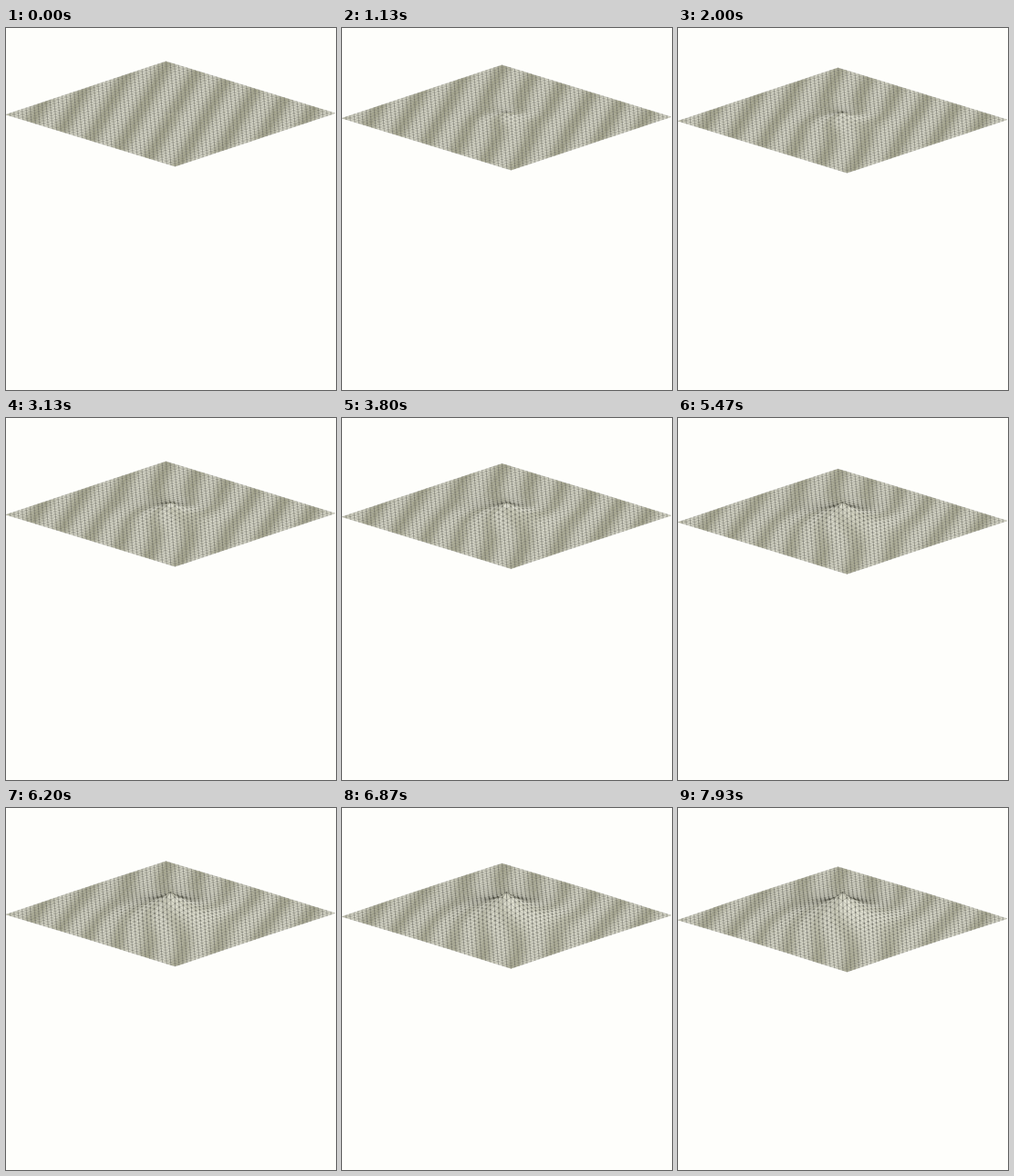
An HTML page with a canvas that plays this animation: 362x398 px, repeating every 8000 ms.

```html
<!DOCTYPE html>
<html lang="en">
<head>
<meta charset="utf-8">
<title>Growing peak on a mesh</title>
<style>
html, body { margin: 0; width: 100%; height: 100%; overflow: hidden; background: #fefefb; }
canvas { display: block; width: 362px; height: 398px; }
</style>
</head>
<body>
<canvas id="stage" width="362" height="398"></canvas>
<script>
const W = 362, H = 398, LOOP = 8000, STEP = 1000 / 15, STEPS = 120;
const N = 40;
const LEFT = { x: 0, y: 95.2 };
const UP = { x: 175.5, y: -58.5 };    // left corner to back corner
const DOWN = { x: 185.5, y: 57 };     // left corner to front corner
const LIGHT = [219, 219, 204], DARK = [172, 172, 148];
const ctx = document.getElementById("stage").getContext("2d");

const clamp = (v, lo, hi) => Math.max(lo, Math.min(hi, v));

// Screen position, height and band offset of every mesh vertex
function buildMesh(progress) {
  const sink = 28.2 * progress;
  const peak = 1.5 + sink;
  const growth = Math.sqrt(progress);
  const spread = 1.2 + 4.7 * growth;
  const mesh = [];
  for (let u = 0; u <= N; u++) {
    mesh.push([]);
    for (let v = 0; v <= N; v++) {
      const du = u - N / 2, dv = v - N / 2;
      const r = Math.hypot(du, dv);
      const h = peak * Math.exp(-r / spread);
      const toFront = (dv - du) / Math.SQRT2 / Math.max(r, 1);
      const bend = 72 * growth * toFront * Math.exp(-r / (1 + 8 * growth));
      const x = LEFT.x + (UP.x * u + DOWN.x * v) / N;
      const flatY = LEFT.y + (UP.y * u + DOWN.y * v) / N;
      mesh[u].push({ x, y: flatY + sink - h, h, band: x + 0.55 * flatY + bend });
    }
  }
  return mesh;
}

// Oblique bands that turn around the peak and fade on it, plus light from the right
function shade(a, b, c, slope) {
  const mean = key => (a[key] + b[key] + c[key]) / 3;
  const wave = 0.5 + 0.5 * Math.cos(2 * Math.PI * (mean("band") - 198) / 37.5);
  const band = Math.pow(wave, 1.3) / (1 + mean("h") * 0.15);
  const glow = clamp(-slope * 4, -16, 7);
  return `rgb(${LIGHT.map((v, i) => Math.round(v + (DARK[i] - v) * band + glow))})`;
}

function path(...points) {
  ctx.beginPath();
  points.forEach(p => ctx.lineTo(p.x, p.y));
  ctx.closePath();
}

function fillTriangle(a, b, c, slope) {
  path(a, b, c);
  ctx.fillStyle = shade(a, b, c, slope);
  ctx.fill();
}

function strokePath(width, color, ...points) {
  path(...points);
  ctx.lineWidth = width;
  ctx.strokeStyle = color;
  ctx.stroke();
}

function drawCell(mesh, u, v) {
  const left = mesh[u][v], back = mesh[u + 1][v];
  const front = mesh[u][v + 1], right = mesh[u + 1][v + 1];
  const slope = right.h - left.h;
  fillTriangle(left, back, front, slope);
  fillTriangle(back, front, right, slope);
  strokePath(0.4, "rgba(65,65,55,0.4)", left, back, right, front);
  strokePath(0.35, "rgba(50,50,45,0.6)", back, front);

  // Knots stand out where the mesh is raised
  ctx.fillStyle = `rgba(40,40,35,${clamp(front.h * 0.06, 0, 0.5)})`;
  ctx.fillRect(front.x - 0.8, front.y - 0.8, 1.6, 1.6);
}

function draw(progress) {
  ctx.fillStyle = "#fefefb";
  ctx.fillRect(0, 0, W, H);
  const mesh = buildMesh(progress);
  // Back to front
  for (let row = 1 - N; row < N; row++) {
    for (let u = Math.max(0, -row); u < Math.min(N, N - row); u++) {
      drawCell(mesh, u, u + row);
    }
  }
}

let shown = -1;
const start = performance.now();
function tick() {
  const t = (performance.now() - start) % LOOP;
  const step = Math.min(STEPS - 1, Math.floor((t + 5) / STEP));
  if (step !== shown) {
    shown = step;
    draw(step / (STEPS - 1));
  }
  requestAnimationFrame(tick);
}
tick();
</script>
</body>
</html>
```
